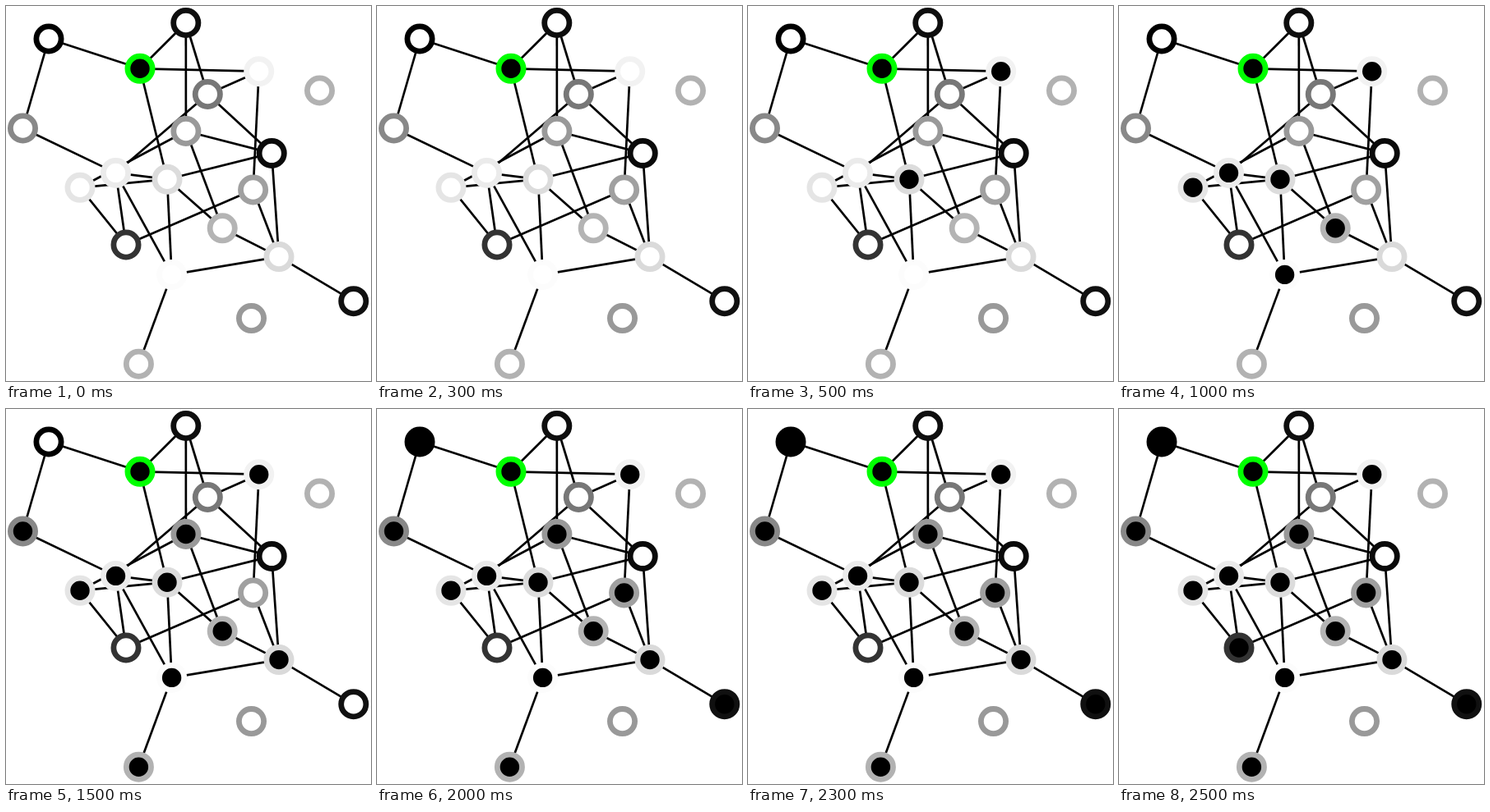
Recreate the animation shown at these times as an HTML page. Size 444 by 457 pixels, loop 3000 ms.

```html
<!DOCTYPE html>
<html>
<head>
<meta charset="utf-8">
<style>
  html, body { margin: 0; overflow: hidden; background: #fff; }
  svg { display: block; }
  line { stroke: #000; stroke-width: 2.7; }
  circle { stroke-width: 6.8; }
</style>
</head>
<body>
<svg id="stage" width="444" height="457"></svg>
<script>
const STEP = 500, STEPS = 6, NEVER = STEPS;

// x, y, ring colour, step at which the node is reached
const nodes = [
  [52, 40, '#000', 4],
  [20.5, 149, '#888', 3],
  [163, 76.3, '#0f0', 0],
  [218.8, 20.5, '#0e0e0e', NEVER],
  [307.7, 79.7, '#f2f2f2', 1],
  [245.3, 107.5, '#777', NEVER],
  [381.5, 103, '#b2b2b2', NEVER],
  [218.9, 152.5, '#999', 3],
  [323.2, 179.4, '#0a0a0a', NEVER],
  [90, 221.3, '#e5e5e5', 2],
  [133.5, 203.4, '#ebebeb', 2],
  [196, 211.2, '#dcdcdc', 1],
  [300.6, 224, '#a0a0a0', 4],
  [263.2, 270.8, '#b4b4b4', 2],
  [146, 291, '#333', 5],
  [332, 305.6, '#dadada', 3],
  [422.8, 359.7, '#101010', 4],
  [201.6, 327.4, '#fcfcfc', 2],
  [298.5, 380.6, '#999', NEVER],
  [161.4, 436.2, '#b2b2b2', 3]
];

const edges = `0-1 0-2 1-10 2-3 2-4 2-11 3-7 3-5 4-5 4-12 5-10 5-8 7-9 7-8 7-13
  8-11 8-15 9-11 9-14 10-11 10-14 10-17 11-13 11-17 12-14 12-15 13-15 15-17
  15-16 17-19`.split(/\s+/).map(pair => pair.split('-'));

function add(tag, attributes) {
  const element = document.createElementNS('http://www.w3.org/2000/svg', tag);
  for (const name in attributes) element.setAttribute(name, attributes[name]);
  return document.getElementById('stage').appendChild(element);
}

for (const [a, b] of edges) {
  const [x1, y1] = nodes[a], [x2, y2] = nodes[b];
  add('line', { x1, y1, x2, y2 });
}
const circles = nodes.map(([cx, cy, stroke]) => add('circle', { cx, cy, r: 15.1, stroke }));

function draw(now) {
  const step = Math.floor(now / STEP) % STEPS;
  circles.forEach((circle, i) =>
    circle.setAttribute('fill', step >= nodes[i][3] ? '#000' : '#fff'));
  requestAnimationFrame(draw);
}
draw(performance.now());
</script>
</body>
</html>
```
